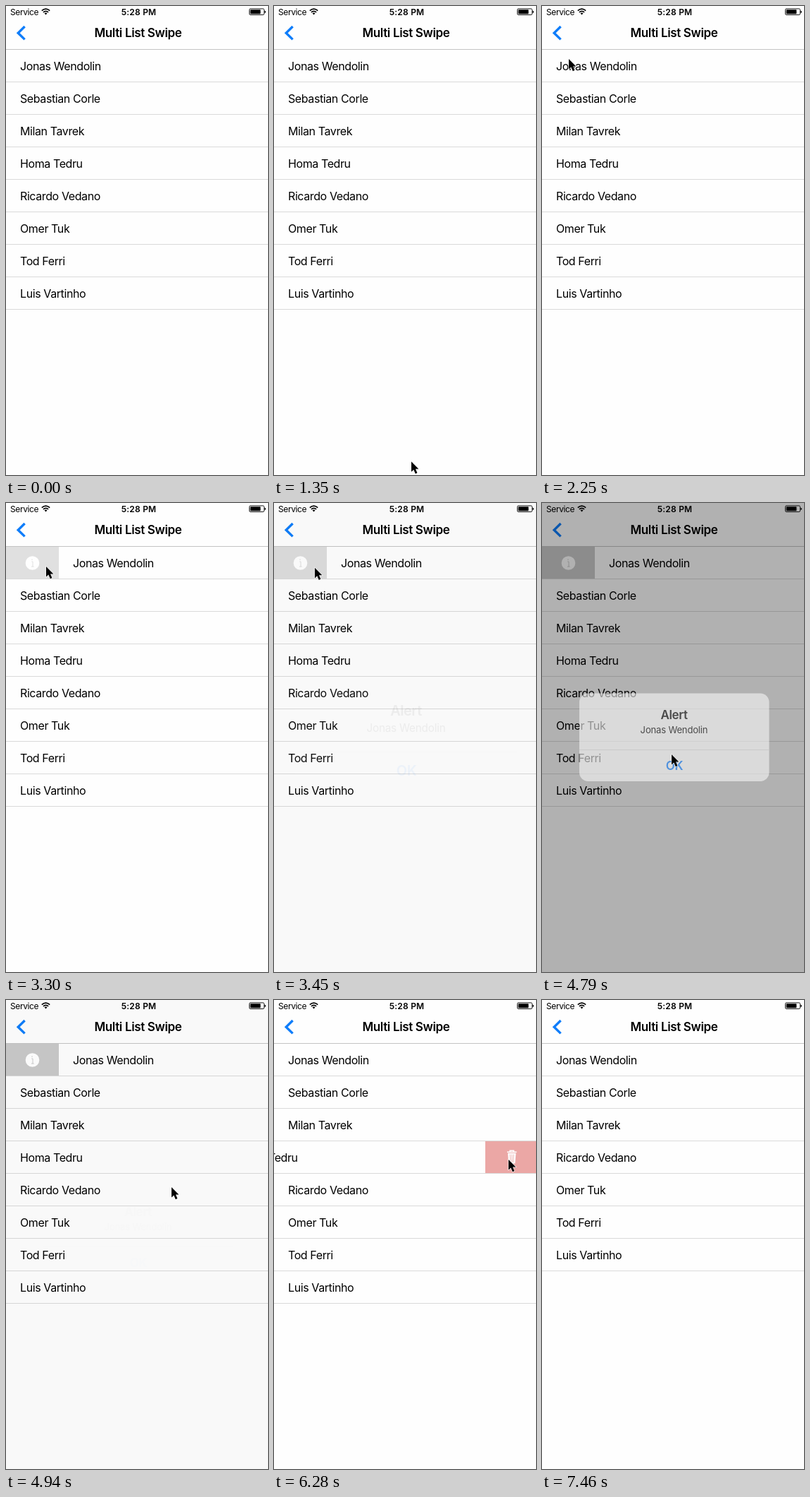
Write an HTML page that moves like this. It is 372 px wide and 664 px high and loops after 7.62 s.

```html
<!DOCTYPE html>
<html lang="en">
<head>
<meta charset="utf-8">
<title>Multi List Swipe</title>
<style>
  html, body { margin: 0; width: 100%; height: 100%; overflow: hidden; background: #fefefe; }
  svg { display: block; width: 372px; height: 664px; font-family: Inter, "Liberation Sans", sans-serif; }
  .item { font-size: 16px; letter-spacing: -.4px; }
  .bold { font-size: 17px; font-weight: 600; letter-spacing: -.35px; }
  .mid { text-anchor: middle; }
</style>
</head>
<body>
<svg viewBox="0 0 372 664">
  <rect width="372" height="664" fill="#fefefe"/>
  <g id="list"></g>

  <path d="M0 61.5H372" stroke="#c4c4c4"/>
  <text x="6" y="13" font-size="12" letter-spacing="-.4">Service</text>
  <g fill="none" stroke="#000" stroke-width="1.7">
    <path d="M50.8 6.6Q56.5 1.6 62.2 6.6"/>
    <path d="M52.9 8.9Q56.5 5.7 60.1 8.9"/>
  </g>
  <path d="M54.5 10.3Q56.5 8.7 58.5 10.3L56.5 12.5Z"/>
  <text class="mid" x="188.6" y="13" font-size="12" font-weight="600" letter-spacing=".2">5:28 PM</text>
  <rect x="345.5" y="3.9" width="21" height="8.6" rx="1.6" fill="none" stroke="#000" stroke-width=".9"/>
  <rect x="346.8" y="5.2" width="14.6" height="6" rx=".6"/>
  <path d="M367.4 6.4Q369 6.8 369 8.2T367.4 10Z"/>
  <path d="M26.6 29L17.2 38.2L26.6 47.4" fill="none" stroke="#0f7dfa" stroke-width="3.4"/>
  <text class="bold mid" x="187.5" y="43.5">Multi List Swipe</text>

  <rect id="dim" width="372" height="664"/>
  <g id="alert">
    <rect x="53" y="269.5" width="269.5" height="124.5" rx="12.5" fill="#f9f9f9"/>
    <path d="M53 349.5H322.5" stroke="#dcdcdc"/>
    <text class="bold mid" x="187.5" y="305.5">Alert</text>
    <text id="message" class="mid" x="187.5" y="325.5" font-size="13" letter-spacing="-.15"></text>
    <text class="bold mid" x="188" y="378" fill="#0a7bff">OK</text>
  </g>
  <path id="cursor" d="M0 0V14.6L3.3 11.5L5.8 17.2L8.4 16L6 10.5H10.4Z"
        stroke="#fff" stroke-width="1.1" paint-order="stroke"/>
</svg>
<script>
const LOOP = 7620, OPEN = 75, ROW = 46, TOP = 62;
const NAMES = ["Jonas Wendolin", "Sebastian Corle", "Milan Tavrek", "Homa Tedru",
  "Ricardo Vedano", "Omer Tuk", "Tod Ferri", "Luis Vartinho"];
const INFO_ROW = 0, TRASH_ROW = 3;
const RELEASE_INFO = 2580, RELEASE_TRASH = 5750, DELETE = 6560;

const BURSTS = [[1350, 1950, 5], [2250, 3150, 7], [3300, 4190, 7],
  [4790, 5690, 7], [5840, 6870, 8], [7010, 7460, 4]];

// Pointer route: [time, x, y]
const ROUTE = [
  [1350, 195, 645], [1500, 158, 430], [1650, 96, 150], [1800, 66, 24], [1950, 40, 74],
  [2250, 38, 75], [2400, 120, 95], [2550, 234, 120], [2700, 222, 120], [2850, 145, 108],
  [3000, 78, 94], [3150, 56, 88], [3450, 58, 92], [3600, 85, 150], [3900, 160, 310],
  [4190, 181, 357], [4790, 184, 356], [4940, 235, 265], [5090, 268, 238], [5240, 285, 228],
  [5390, 280, 226], [5690, 150, 222], [5840, 180, 222], [5990, 260, 225], [6140, 325, 227],
  [6280, 333, 226], [6580, 333, 226], [6870, 331, 217], [7010, 318, 300], [7160, 325, 470],
  [7310, 335, 640], [7460, 340, 670]];

const $ = id => document.getElementById(id);
const clamp = v => Math.max(0, Math.min(1, v));
const ramp = (t, from, to) => clamp((t - from) / (to - from));
const set = (node, attrs) => { for (const k in attrs) node.setAttribute(k, attrs[k]); };

function make(parent, tag, attrs) {
  const node = document.createElementNS("http://www.w3.org/2000/svg", tag);
  set(node, attrs);
  return parent.appendChild(node);
}

function pointerAt(t) {
  let i = 0;
  while (i < ROUTE.length - 2 && ROUTE[i + 1][0] <= t) i++;
  const [a, b] = [ROUTE[i], ROUTE[i + 1]], p = ramp(t, a[0], b[0]);
  return { x: a[1] + (b[1] - a[1]) * p, y: a[2] + (b[2] - a[2]) * p };
}

function spring(t, start, from, to) {
  const s = Math.max(0, t - start) / 1000, w = 10.45;
  const rest = Math.exp(-11 * s) * (Math.cos(w * s) + 11 / w * Math.sin(w * s));
  return to + (from - to) * rest;
}

// Hold the latest step that has been reached
function heldTime(t) {
  let held = 0;
  for (const [start, end, steps] of BURSTS)
    for (let i = 0; i < steps; i++) {
      const at = Math.floor((start + (end - start) * i / (steps - 1)) / 10) * 10;
      if (at <= t) held = at;
    }
  return held;
}

function infoOffset(t) {
  const drag = at => pointerAt(at).x - 38;
  if (t < 2250) return 0;
  if (t < RELEASE_INFO) return drag(t);
  if (t < RELEASE_TRASH) return spring(t, RELEASE_INFO, drag(RELEASE_INFO), OPEN);
  return spring(t, RELEASE_TRASH, OPEN, 0);
}

function trashOffset(t) {
  const drag = at => pointerAt(at).x - 280;
  if (t < 5390) return 0;
  if (t < RELEASE_TRASH) return drag(Math.min(t, 5690));
  if (t < DELETE) return spring(t, RELEASE_TRASH, drag(5690), -OPEN);
  return spring(t, DELETE, -OPEN, 0);
}

// Pressed buttons are faded, then recover after release
const pressed = (t, down, up, low) => t < down ? 1 : low + (1 - low) * ramp(t, up, up + 250);

const rows = NAMES.map((_, i) => {
  const g = make($("list"), "g", { transform: `translate(0 ${TOP + i * ROW})` });
  const info = make(g, "g", {}), trash = make(g, "g", {});
  make(info, "rect", { width: OPEN, height: 45.5, fill: "#c9c9c9" });
  make(info, "circle", { cx: 37.5, cy: 23, r: 9.8, fill: "#fff" });
  make(info, "path", { d: "M36.3 21H38V28M36 28H39.6M37 17.3V19", stroke: "#c9c9c9", fill: "none" });
  make(trash, "rect", { x: 300, width: 72, height: 45.5, fill: "#d9534f" });
  make(trash, "path", { d: "M331 15.2H344.5M335 15V13.3H340.5V15", stroke: "#fff", "stroke-width": 1.4, fill: "none" });
  make(trash, "path", { d: "M332 16.7H343.5L342.3 31.5H333.2Z", fill: "#fff" });
  make(trash, "path", { d: "M335.2 18.5L335.8 29.8M337.8 18.5V29.8M340.3 18.5L339.7 29.8", stroke: "#d9534f", "stroke-width": .8 });
  const front = make(g, "g", {});
  make(front, "rect", { width: 372, height: 46, fill: "#fefefe" });
  const label = make(front, "text", { x: 20, y: 29, class: "item" });
  make(g, "path", { d: "M0 45.5H372", stroke: "#dadada" });
  return { g, info, trash, front, label };
});
$("message").textContent = NAMES[INFO_ROW];

function render(t) {
  const names = t < DELETE ? NAMES : NAMES.filter((_, i) => i !== TRASH_ROW);
  rows.forEach((row, i) => {
    const dx = i === INFO_ROW ? infoOffset(t) : i === TRASH_ROW ? trashOffset(t) : 0;
    set(row.g, { visibility: i < names.length ? "visible" : "hidden" });
    set(row.front, { transform: `translate(${dx} 0)` });
    set(row.info, { opacity: dx > .3 ? pressed(t, 3250, 3400, .55) : 0 });
    set(row.trash, { opacity: dx < -.3 ? pressed(t, 6250, 6420, .5) : 0 });
    row.label.textContent = names[i] || "";
  });

  const shown = 1 - (1 - ramp(t, 3430, 3850)) ** 2, left = 1 - ramp(t, 4740, 4950);
  const scale = 1 + .18 * (1 - shown);
  set($("dim"), { opacity: .4 * shown * left });
  set($("alert"), {
    opacity: shown * left * left,
    transform: `translate(187.5 332) scale(${scale}) translate(-187.5 -332)`
  });

  const { x, y } = pointerAt(t);
  set($("cursor"), {
    transform: `translate(${x} ${y})`,
    visibility: t >= 1350 && t < 7460 ? "visible" : "hidden"
  });
}

const began = performance.now();
function tick() {
  render(heldTime((performance.now() - began) % LOOP));
  requestAnimationFrame(tick);
}
tick();
</script>
</body>
</html>
```
